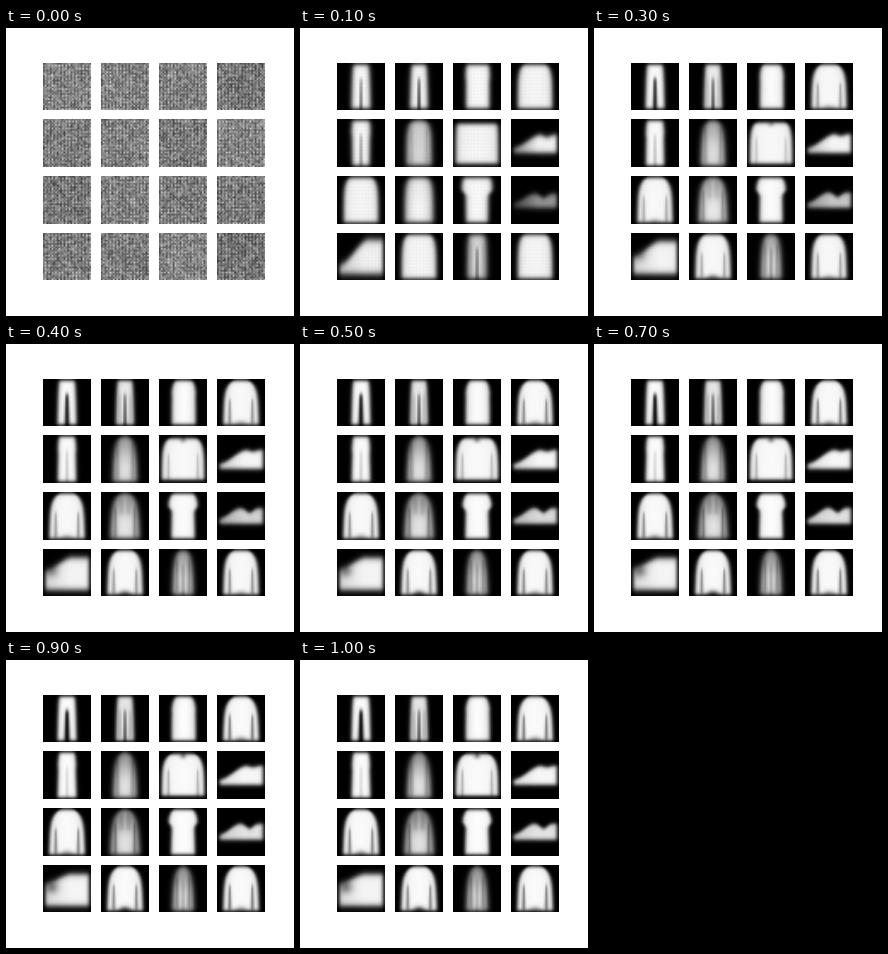
Animation, 288 px wide and 288 px high, one loop 1200 ms. Source, as an HTML page with a canvas:

```html
<!DOCTYPE html>
<html lang="en">
<head>
<meta charset="utf-8">
<title>Learned garments</title>
<style>
  html, body { margin: 0; width: 100%; height: 100%; overflow: hidden; background: #fff; }
  canvas { display: block; width: 288px; height: 288px; }
</style>
</head>
<body>
<canvas id="stage" width="288" height="288"></canvas>
<script>
const LOOP = 1200, STEP = 100, LAST = 10, N = 28, MID = N / 2;

const ctx = document.getElementById('stage').getContext('2d');
const cell = document.createElement('canvas');
cell.width = cell.height = N;
const cellCtx = cell.getContext('2d');
const pixels = cellCtx.createImageData(N, N);

const mix = (a, b, t) => a + (b - a) * t;
const clamp = t => Math.min(1, Math.max(0, t));
const ease = t => clamp(t) ** 2 * (3 - 2 * clamp(t));
const bell = d => Math.exp(-d * d);
const soft = (d, s = 0.6) => 1 / (1 + Math.exp(-d / s));
const hash = (x, y, k) => {
  const v = Math.sin(x * 127.1 + y * 311.7 + k * 74.7) * 43758.5453;
  return v - Math.floor(v);
};

// A setting is a constant or an [early, late] pair; p is the training progress.
const at = (value, p) => Array.isArray(value) ? mix(...value, p) : value;
const progress = step => 1 - Math.exp((1 - step) / 2);

// Mirrored dark line from row y0 down to y1, x units off the middle.
const fold = (x, y0, y1, depth, width = 0.9) => ({ x, y0, y1, depth, width });

function foldShade({ x, y0, y1, depth, width }, dx, y, p) {
  const w = at(width, p) * mix(0.7, 1.3, clamp((y - y0) / (y1 - y0)));
  return 1 - at(depth, p) * bell((dx - x) / w) * soft(y - y0, 0.8) * soft(y1 - y);
}

// neck narrows the top, flare widens the bottom, cap adds short sleeves,
// dim darkens the sides and fade darkens the upper part.
function garment({ width, neck = 0.2, flare = 0, cap = 0, top = 1, bottom = 27, center = MID,
                   level = 0.99, dim = 0.06, fade = 0, blur = [0.75, 0.55], folds = [] }) {
  return (x, y, p) => {
    const s = at(blur, p), dx = Math.abs(x - center);
    const half = at(width, p) * (1 - at(neck, p) * Math.exp((1 - y) / 4))
      + at(flare, p) * (y / MID - 1) + cap * soft(9.7 - y, 0.9);
    const shape = soft(half - dx, s) * soft(y - at(top, p), s) * soft(bottom - y, s);
    const light = at(level, p) * (1 - at(dim, p) * Math.min(1, dx / half) ** 2)
      * (1 - at(fade, p) * (1 - ease(y / 20)));
    return folds.reduce((v, f) => v * foldShade(f, dx, y, p), shape * light);
  };
}

// The upper edge rises from toe to heel within reach, with a dip for the opening.
function shoe({ toe, heel, reach, dip = 0, dipX = 21, base, level, left, dent = 0, blur = [0.9, 0.65] }) {
  return (x, y, p) => {
    const s = at(blur, p);
    const top = mix(at(toe, p), at(heel, p), ease((x - 1) / at(reach, p)))
      + at(dip, p) * bell((x - dipX) / 3);
    const light = at(level, p) * mix(at(left, p), 1, clamp(x / 16));
    const hollow = 1 - at(dent, p) * bell(Math.hypot(x - 5, y - 13) / 4);
    return light * hollow * soft(y - top, s) * soft(base - y, s) * soft(x - 1.5) * soft(26.7 - x);
  };
}

const trousers = extra => garment({
  width: 5.3, neck: 0.1, flare: 0.3,
  folds: [fold(0, 9, 30, [0.65, 1], [0.7, 1.5])], ...extra
});
const pullover = (depth, hem = 0.4) => garment({
  width: 10.1, neck: [0.3, 0.54], flare: [0, 0.4], level: 0.98,
  folds: [fold(6.6, 12, 27, [0, depth]), fold(0, 25.2, 30, [0, hem], 4.5)]
});
const coat = extra => garment({
  blur: [0.9, 0.8], dim: [0.2, 0.4], fade: [0.05, 0.35], ...extra
});

const tiles = [
  trousers(),
  trousers({
    width: 5, level: [0.98, 0.9],
    folds: [fold(0, 9, 29, [0.8, 0.7], 0.8), fold(3, 9, 26, [0, 0.2])]
  }),
  garment({ width: [6.8, 7.1], neck: [0.1, 0.4], cap: 0.4, center: 14.4, dim: [0.03, 0.15] }),
  pullover(0.5),

  garment({ width: 5.2, neck: 0.15, flare: [-0.2, 0.4], cap: 0.4, folds: [fold(0, 9, 29, [0.4, 0.15])] }),
  coat({
    width: [7.5, 6.9], neck: [0.4, 0.5], flare: [0, 0.6], level: [0.85, 0.88],
    folds: [fold(4.3, 5, 26, [0.1, 0.2])]
  }),
  garment({
    width: 12.4, neck: [0.08, 0.5], top: [2.8, 1.8], bottom: 26, level: 0.98,
    folds: [fold(0, 0, 4, [0, 0.5], 1.6), fold(8.6, 11, 27, [0, 0.25])]
  }),
  shoe({ toe: 16.7, heel: [9.2, 8.6], reach: 17, dip: [1.2, 0.8], base: 19.7, level: 0.97, left: [0.55, 0.9] }),

  pullover(0.45),
  coat({
    width: 8.4, neck: [0.3, 0.55], flare: [0, 0.7], level: [0.98, 0.88],
    folds: [fold(5.6, 9, 27, [0, 0.35]), fold(2, 3, 13, [0, 0.15], 1.3)]
  }),
  garment({ width: [6.6, 6.7], neck: [0.2, 0.45], flare: [-0.2, 0.3], cap: 2.5 }),
  shoe({
    toe: 15.5, heel: [10.5, 9.2], reach: 13, dip: [2, 2.6], dipX: 19,
    base: 18.5, level: [0.6, 0.9], left: [0.4, 0.9]
  }),

  shoe({
    toe: [19, 11], heel: [4, 5.5], reach: [18, 16], base: 24.3,
    level: 0.96, left: [0.85, 0.9], dent: [0, 0.45], blur: [1.3, 1]
  }),
  pullover(0.45, 0.8),
  coat({
    width: [5.7, 6.3], neck: [0.15, 0.5], flare: [0, 0.5], level: [0.88, 0.85],
    folds: [fold(0, 9, 29, [0.5, 0.2]), fold(3.4, 7, 26, [0.1, 0.25])]
  }),
  pullover(0.5)
];

function noise(x, y, id) {
  const dots = x % 2 && y % 2 ? 0.22 : y % 2 ? -0.08 : 0;
  return mix(0.42, 0.5, hash(id, 1, 2)) + dots + (hash(x, y, id) - 0.5) * 0.34;
}

function shade(x, y, step, id) {
  if (step === 0) return noise(x, y, id);
  const p = progress(step);
  const weave = x % 2 && y % 2 ? 0 : 0.03 * (1 - p);
  return tiles[id](x + 0.5, y + 0.5, p) * (1 - weave);
}

function drawTile(id, step) {
  for (let i = 0; i < N * N; i++) {
    const v = 255 * shade(i % N, Math.floor(i / N), step, id);
    pixels.data.set([v, v, v, 255], i * 4);
  }
  cellCtx.putImageData(pixels, 0, 0);
  const row = Math.floor(id / 4);
  const top = Math.floor(35 + 56.67 * row);
  const bottom = Math.round(82.3 + 56.67 * row);
  ctx.drawImage(cell, 37 + 58 * (id % 4), top, 48, bottom - top);
}

let shown = -1;
function render(now) {
  const step = Math.min(LAST, Math.floor((now % LOOP) / STEP));
  if (step === shown) return;
  shown = step;
  ctx.fillStyle = '#fff';
  ctx.fillRect(0, 0, 288, 288);
  tiles.forEach((_, id) => drawTile(id, step));
}

const start = performance.now();
function tick() {
  render(performance.now() - start);
  requestAnimationFrame(tick);
}
tick();
</script>
</body>
</html>
```
